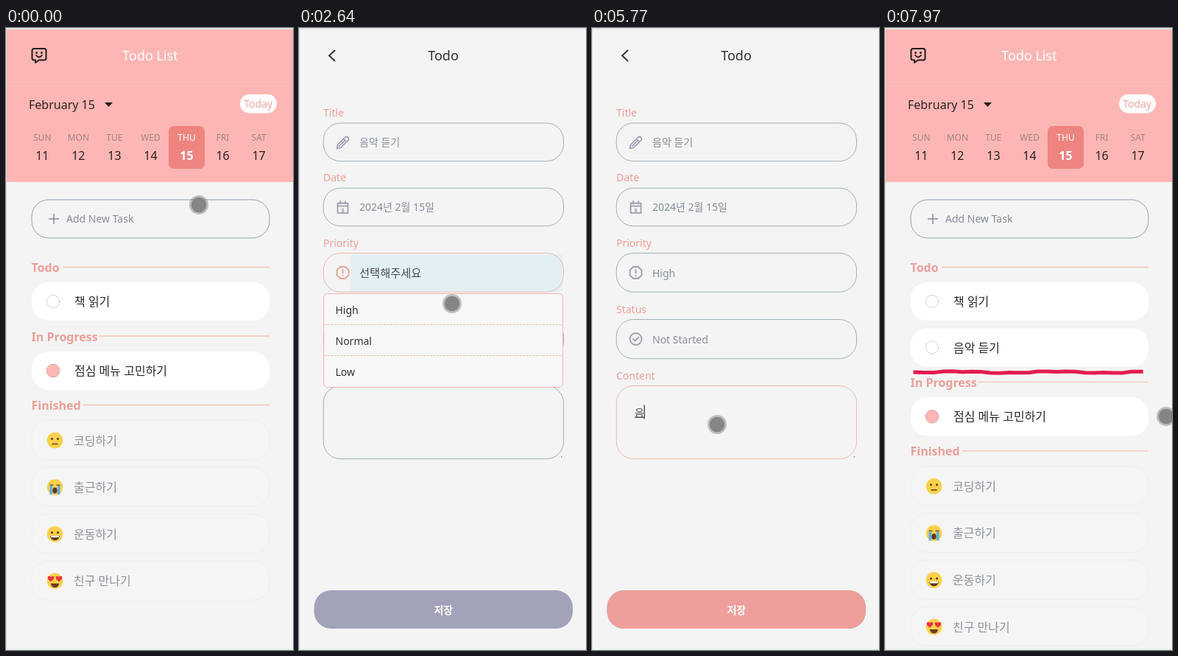
Write an HTML page that moves like this. It is 390 by 844 pixels and loops after 8000 ms.

```html
<!DOCTYPE html>
<html lang="ko">
<head>
<meta charset="utf-8">
<title>Todo List</title>
<style>
  html, body { margin: 0; width: 100%; height: 100%; overflow: hidden; background: #f4f4f4; }
  svg { display: block; width: 390px; height: 844px; font-family: "Noto Sans", "Noto Sans CJK KR", "Noto Sans CJK", sans-serif; }
  text { white-space: pre; }
</style>
</head>
<body>
<svg id="stage" viewBox="0 0 390 844"></svg>
<script>
const LOOP = 8000;
const PINK = '#fdb6b4', ROSE = '#eb9f99', GREY = '#858d99', LINE = '#a3afb4', DARK = '#2e3336';
const stage = document.getElementById('stage');

// Moments of the story, in ms
const T = {
  form: 450, title: 1040, priority: 2550, high: 2810,
  status: 3240, chosen: 4260, content: 4860, save: 6500, list: 6690
};
const TYPED = ['', 'ㅇ', '으', '음', '음ㅇ', '음아', '음악', '음악 ', '음악 ㄷ', '음악 드', '음악 듣', '음악 듣ㄱ', '음악 듣기'];
const titleKeys = [1540, 1730, 1940, 2100, 2130, 2160, 2190, 2220, 2250, 2280, 2320, 2360];
const contentKeys = [5480, 5570, 5770, 5810, 5850, 5890, 5930, 5970, 6010, 6050, 6090, 6130];

// Pointer: time, x, y
const PATH = [
  [0, 262, 240], [320, 262, 258], [480, 262, 258], [840, 256, 176], [900, 256, 169],
  [2360, 256, 169], [2520, 212, 335], [2560, 212, 338], [2640, 208, 374], [2760, 207, 378],
  [2820, 206, 379], [2900, 196, 396], [2940, 175, 439], [3240, 175, 439], [3560, 173, 470],
  [4240, 173, 470], [4600, 171, 537], [4840, 171, 537], [5570, 170, 538], [6150, 170, 538],
  [6450, 238, 785], [6620, 238, 789], [6900, 239, 680], [7420, 355, 528], [7970, 382, 527], [8000, 382, 527]
];

const during = (t, a, b) => t >= a && t < b;
const typed = (t, keys) => TYPED[keys.filter(k => t >= k).length];

const text = (x, y, str, size, fill, weight = 400, anchor = 'start') =>
  `<text x="${x}" y="${y}" font-size="${size}" fill="${fill}" font-weight="${weight}" text-anchor="${anchor}">${str}</text>`;
const box = (x, y, w, h, r, fill, stroke = 'none') =>
  `<rect x="${x}" y="${y}" width="${w}" height="${h}" rx="${r}" fill="${fill}" stroke="${stroke}"/>`;
const path = (d, stroke, width = 1, extra = '') =>
  `<path d="${d}" fill="none" stroke="${stroke}" stroke-width="${width}" ${extra}/>`;
const dot = (x, y, r, fill, extra = '') => `<circle cx="${x}" cy="${y}" r="${r}" fill="${fill}" ${extra}/>`;
const at = (x, y, body) => `<g transform="translate(${x} ${y})">${body}</g>`;
const ROUND = 'stroke-linecap="round" stroke-linejoin="round"';

function pointer(t) {
  const i = PATH.findIndex(p => p[0] > t);
  const [t0, x0, y0] = PATH[i - 1], [t1, x1, y1] = PATH[i];
  const u = (t - t0) / (t1 - t0), e = u * u * (3 - 2 * u);
  const x = x0 + (x1 - x0) * e, y = y0 + (y1 - y0) * e;
  return dot(x, y, 13, '#777', 'opacity=".45"') + dot(x, y, 10.3, '#858584');
}

const eyes = dot(-4, -2, 1.6, '#5a4520') + dot(4, -2, 1.6, '#5a4520');
const heart = x => `<path transform="translate(${x} -4)" d="M0 5C-7 0-4.5-4.5 0-1.5C4.5-4.5 7 0 0 5Z" fill="#e8333f"/>`;
const FACES = [
  eyes + path('M-4 5H4', '#5a4520', 1.5),
  path('M-7-3H-2M2-3H7', '#5a4520', 1.4) + '<ellipse cy="4.5" rx="3.2" ry="4" fill="#5a3a20"/>' +
    path('M-5.2-2V10M5.2-2V10', '#62aee8', 3.6),
  eyes + '<path d="M-6.5 2H6.5A6.5 6.5 0 0 1-6.5 2Z" fill="#5a3a20"/><path d="M-6 2H6L5 4.5H-5Z" fill="#fff"/>',
  '<path d="M-5.5 3.5H5.5A5.5 5.5 0 0 1-5.5 3.5Z" fill="#6a3a20"/>' + heart(-5.5) + heart(5.5)
];

function section(name, y, x) {
  return text(34.5, y + 6, name, 16, ROSE, 600) + path(`M${x} ${y - .5}H358`, '#f0c3ba', 1.3);
}

function card(y, name, started) {
  const mark = started
    ? dot(64, y + 26, 8.8, PINK, 'stroke="#dfa39e"')
    : dot(64, y + 26, 8.5, 'none', 'stroke="#b5b5b5" stroke-dasharray="2 1.4"');
  return box(35, y, 323, 52, 22, '#fff') + mark + text(93, y + 32, name, 16, '#25282b', 500);
}

function underline(t) {
  const k = Math.floor(t / 130);
  let d = 'M41 467';
  for (let i = 1; i < 25; i++) {
    const y = 467 + Math.sin(i * .6 + k * 2.3) + .6 * Math.sin(i * 1.9 + k);
    d += `L${41 + i * 12.8} ${y.toFixed(1)}`;
  }
  return path(d, '#e51c50', 5, 'stroke-linecap="square" stroke-linejoin="round"');
}

function listPage(t) {
  const added = t >= T.list, dy = added ? 62.3 : 0;
  const days = ['SUN', 'MON', 'TUE', 'WED', 'THU', 'FRI', 'SAT'];
  const done = ['코딩하기', '출근하기', '운동하기', '친구 만나기'];
  return box(0, 2, 390, 207, 0, PINK) +
    at(45, 37, path('M-7-9H7Q9.5-9 9.5-6.5V4Q9.5 6.5 7 6.5H0L-5 10V6.5H-7Q-9.5 6.5-9.5 4V-6.5Q-9.5-9-7-9Z', '#241b1b', 2, ROUND) +
      dot(-3.5, -3.5, 1.5, '#241b1b') + dot(3.5, -3.5, 1.5, '#241b1b') + path('M-4 0Q0 5 4 0', '#241b1b', 1.8, ROUND)) +
    text(196, 44, 'Todo List', 18, '#fff', 400, 'middle') +
    path('M0 73.5H390', '#fcbdba') +
    text(31, 109.5, 'February 15', 16, '#2b2222', 500) +
    '<path d="M134 101H145L139.5 107Z" fill="#241b1b"/>' +
    box(318, 90, 50, 25.5, 12.7, '#fff') + text(342.7, 108, 'Today', 14, '#f2a5a1', 500, 'middle') +
    box(221, 133, 49, 58, 7, '#ee847f') +
    days.map((d, i) => {
      const x = 49.3 + i * 49.05, on = i === 4;
      return text(x, 153.4, d, 12, on ? '#fff' : '#a08588', on ? 500 : 400, 'middle') +
        text(x, 178.7, 11 + i, 16, on ? '#fff' : '#2b2222', on ? 700 : 500, 'middle');
    }).join('') +
    box(35, 233, 323, 52, 23, 'none', '#929eaa') +
    path('M58 259H72M65 252V266', GREY, 1.5) + text(82, 264, 'Add New Task', 14, GREY, 500) +
    section('Todo', 325, 77) + card(345, '책 읽기') +
    (added ? card(407.5, '음악 듣기') : '') +
    section('In Progress', 418.5 + dy, 126) + card(439 + dy, '점심 메뉴 고민하기', true) +
    section('Finished', 512 + dy, 105) +
    done.map((name, i) => {
      const y = 532.5 + dy + i * 63.6;
      return box(35, y, 323, 53, 22, '#f5f5f5', '#eeeeee') +
        at(66.5, y + 27, dot(0, 0, 10.8, '#fcd04b') + FACES[i]) +
        text(92, y + 33, name, 16, '#8a929e', 500);
    }).join('') +
    (added ? underline(t) : '');
}

const ICONS = {
  pen: c => path('M-8 8L-7 3L3-7Q5-9 7-7Q9-5 7-3L-3 7ZM1-5L5-1M-5 5L2-2', c, 1.7, ROUND),
  date: c => path('M-7-6H7V7.5H-7ZM-7-2H7M-3.5-8.5V-5M3.5-8.5V-5', c, 1.8, ROUND) + text(0, 6.3, 's', 9, c, 700, 'middle'),
  alert: c => path('M-3.3-8H3.3L8-3.3V3.3L3.3 8H-3.3L-8 3.3V-3.3Z', c, 1.8, ROUND) + path('M0-4.5V1M0 3V4.8', c, 1.8),
  check: c => path('M-8 0A8 8 0 1 1 8 0A8 8 0 1 1-8 0M-3.5 0L-1 2.7L4-2.5', c, 1.8, ROUND)
};

function field(label, y, h, focus, icon, body) {
  return text(33, y - 9, label, 14, ROSE, 500) +
    box(33.2, y, 326.3, h, 23, 'none', focus ? '#eab9b0' : LINE) +
    (icon ? at(59.5, y + 26.5, ICONS[icon](focus && icon !== 'pen' ? ROSE : '#9b9eb0')) : '') + body;
}

// Text being entered; the syllable under composition is underlined
function entry(x, y, str, focus, lit) {
  if (!focus) return text(x, y, str, 14, GREY, 500);
  const head = str.slice(0, -1), last = str.slice(-1);
  const width = [...str].reduce((w, c) => w + (c === ' ' ? 3.64 : 12.88), 0);
  return text(x, y, `${head}<tspan text-decoration="underline">${last.trim()}</tspan>`, 14, '#4b5054') +
    (lit ? path(`M${x + width + .3} ${y - 15}V${y + 4}`, '#333', 1.2) : '');
}

function choice(y, value, focus) {
  return value
    ? text(82, y + 32.3, value, 14, GREY, 500)
    : text(82, y + 32.3, '선택해주세요', 15.3, focus ? '#454b4f' : '#8d949e');
}

function menu(y, items) {
  return box(33.7, y, 324.8, 127, 5, '#f7f7f7', '#efb8b1') +
    path(`M34 ${y + 42}H358M34 ${y + 84}H358`, '#eebdb4', 1, 'stroke-dasharray="3 1.5"') +
    items.map((s, i) => text(49.5, y + 27 + i * 42.3, s, 14, DARK, 500)).join('');
}

function formPage(t) {
  const onTitle = during(t, T.title, 2500), onContent = during(t, T.content, T.save);
  const onPriority = during(t, T.priority, T.high), onStatus = during(t, T.status, T.chosen);
  const ready = Math.max(0, Math.min(1, (t - T.chosen) / 200));
  const lit = since => (t - since) % 1000 < 500;
  const glow = (y, start) => during(t, start, start + 300) ? box(70, y + 2, 288, 50, 0, '#e3f0f3') : '';
  const button = fill => box(20.5, 763, 351.5, 52, 23, fill);
  return path('M49 30L41 37.5L49 45', DARK, 2) +
    text(196, 44, 'Todo', 18, DARK, 400, 'middle') +
    field('Title', 129, 51.7, onTitle, 'pen',
      entry(82, 160, typed(t, titleKeys), onTitle, t > 1500 || lit(T.title))) +
    field('Date', 217.2, 51.5, false, 'date', text(82, 248.4, '2024년 2월 15일', 14, GREY, 500)) +
    (onPriority ? glow(305.5, T.priority) : '') +
    field('Priority', 305.5, 52.7, onPriority, 'alert', choice(305.5, t >= T.high && 'High', onPriority)) +
    (onStatus ? glow(395.5, T.status) : '') +
    field('Status', 395.5, 53.2, onStatus, 'check', choice(395.5, t >= T.chosen && 'Not Started', onStatus)) +
    field('Content', 485.6, 99, onContent, '',
      entry(58, 526.5, typed(t, contentKeys), onContent, t > 5400 || lit(T.content))) +
    dot(356.7, 582, .8, '#777') +
    button('#a2a2b9') + `<g opacity="${ready}">${button('#ef9f9b')}</g>` +
    text(196.3, 794.7, '저장', 14, '#fff', 700, 'middle') +
    (onPriority ? menu(360.5, ['High', 'Normal', 'Low']) : '') +
    (onStatus ? menu(451, ['Not Started', 'In Progress', 'Finished']) : '');
}

function frame(now) {
  const t = now % LOOP;
  stage.innerHTML = box(0, 0, 390, 844, 0, '#f4f4f4') +
    (during(t, T.form, T.list) ? formPage(t) : listPage(t)) +
    box(0, 0, 390, 2, 0, '#e0e4e6') + box(0, 0, 1, 844, 0, '#dbe1e3') +
    box(0, 843, 390, 1, 0, '#d6f2d6') + pointer(t);
  requestAnimationFrame(tick);
}

const start = performance.now();
function tick() { frame(performance.now() - start); }
tick();
</script>
</body>
</html>
```
